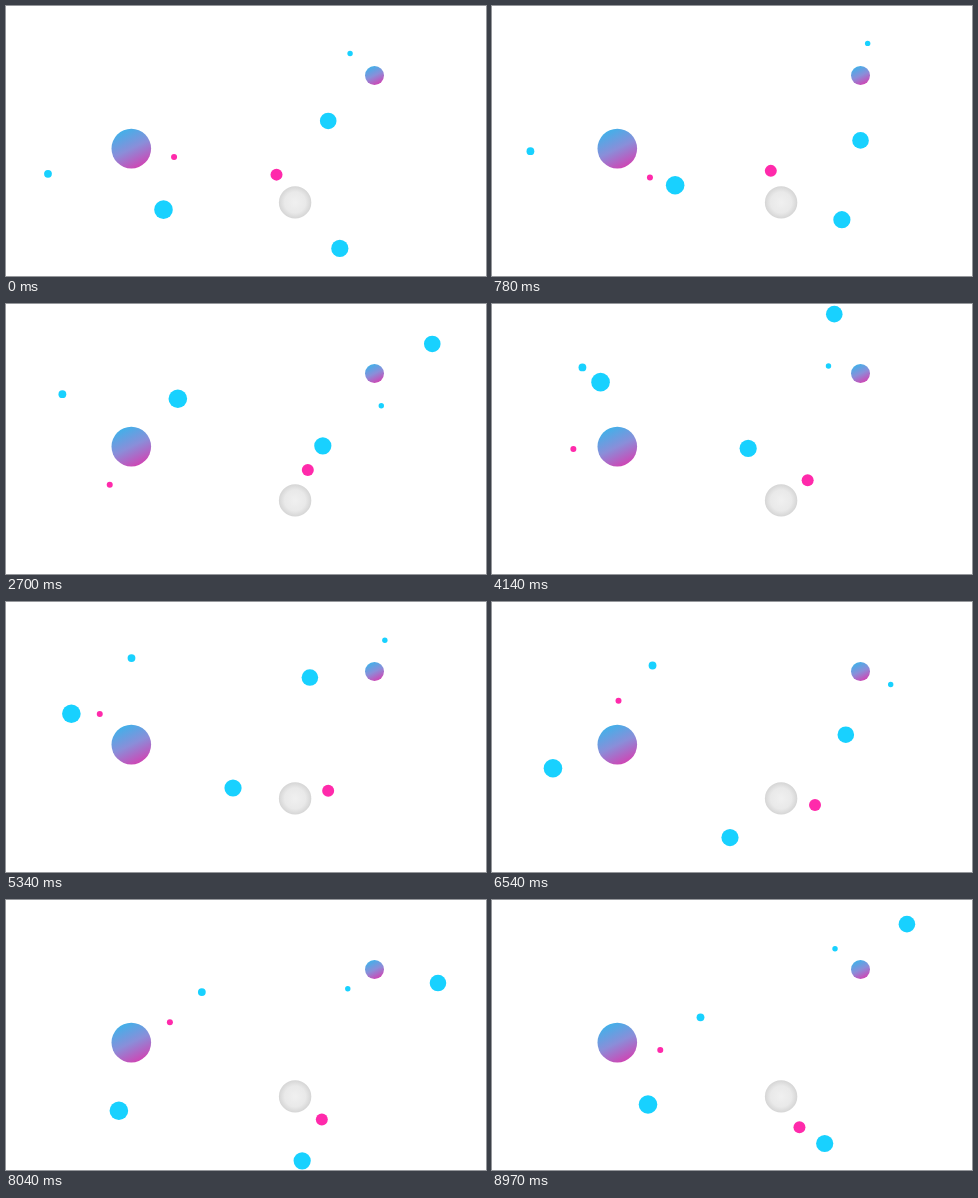
An HTML page that plays this animation: 480 px wide and 270 px high, repeating every 9000 ms.

```html
<!DOCTYPE html>
<html lang="en">
<head>
<meta charset="utf-8">
<title>Orbits</title>
<style>
  html, body { margin: 0; width: 100%; height: 100%; overflow: hidden; background: #fff; }
  svg { display: block; width: 100vw; height: 100vh; }
</style>
</head>
<body>
<svg viewBox="0 0 480 270" xmlns="http://www.w3.org/2000/svg">
  <defs>
    <linearGradient id="dusk" x1="0.28" y1="0.04" x2="0.72" y2="0.96">
      <stop offset="0" stop-color="#42b0e9"/>
      <stop offset="0.5" stop-color="#8a8ed9"/>
      <stop offset="1" stop-color="#cf45b4"/>
    </linearGradient>
    <radialGradient id="pearl">
      <stop offset="0" stop-color="#f0f0f0"/>
      <stop offset="0.65" stop-color="#e9e9e9"/>
      <stop offset="1" stop-color="#d5d5d5"/>
    </radialGradient>
  </defs>
  <g id="planets">
    <circle cx="125.3" cy="142.6" r="19.8" fill="url(#dusk)"/>
    <circle cx="289.1" cy="196.4" r="16.2" fill="url(#pearl)"/>
    <circle cx="368.5" cy="69.5" r="9.5" fill="url(#dusk)"/>
  </g>
  <g id="moons"></g>
</svg>
<script>
const LOOP = 9000;
const STEP = 36; // the motion advances in 250 steps per loop
const CYAN = '#18d1ff';
const PINK = '#ff2aab';

// start and sweep are in degrees, clockwise on screen
const moons = [
  { cx: 125.1, cy: 144, orbit: 67.9, r: 9.3, start: 61.5, sweep: -360, fill: CYAN },
  { cx: 125.1, cy: 142.5, orbit: 43.8, r: 3, start: 11.2, sweep: 360, fill: PINK },
  { cx: 125.4, cy: 143.1, orbit: 87, r: 3.9, start: 163.5, sweep: 180, fill: CYAN },
  { cx: 288.8, cy: 198.3, orbit: 63, r: 8.6, start: 44.4, sweep: -360, fill: CYAN },
  { cx: 288.8, cy: 198, orbit: 34.6, r: 6, start: 238.1, sweep: 180, fill: PINK },
  { cx: 368.5, cy: 69.5, orbit: 64.9, r: 8.3, start: 135.5, sweep: -542, fill: CYAN },
  { cx: 368.5, cy: 69.5, orbit: 32.9, r: 2.7, start: 222.1, sweep: 720, fill: CYAN }
];

const group = document.getElementById('moons');
for (const moon of moons) {
  moon.node = document.createElementNS('http://www.w3.org/2000/svg', 'circle');
  moon.node.setAttribute('r', moon.r);
  moon.node.setAttribute('fill', moon.fill);
  group.appendChild(moon.node);
}

function draw(time) {
  const progress = Math.floor((time % LOOP) / STEP) * STEP / LOOP;
  for (const { node, cx, cy, orbit, start, sweep } of moons) {
    const angle = (start + sweep * progress) * Math.PI / 180;
    node.setAttribute('cx', cx + orbit * Math.cos(angle));
    node.setAttribute('cy', cy + orbit * Math.sin(angle));
  }
}

const begin = performance.now();
function tick() {
  draw(performance.now() - begin);
  requestAnimationFrame(tick);
}
tick();
</script>
</body>
</html>
```
